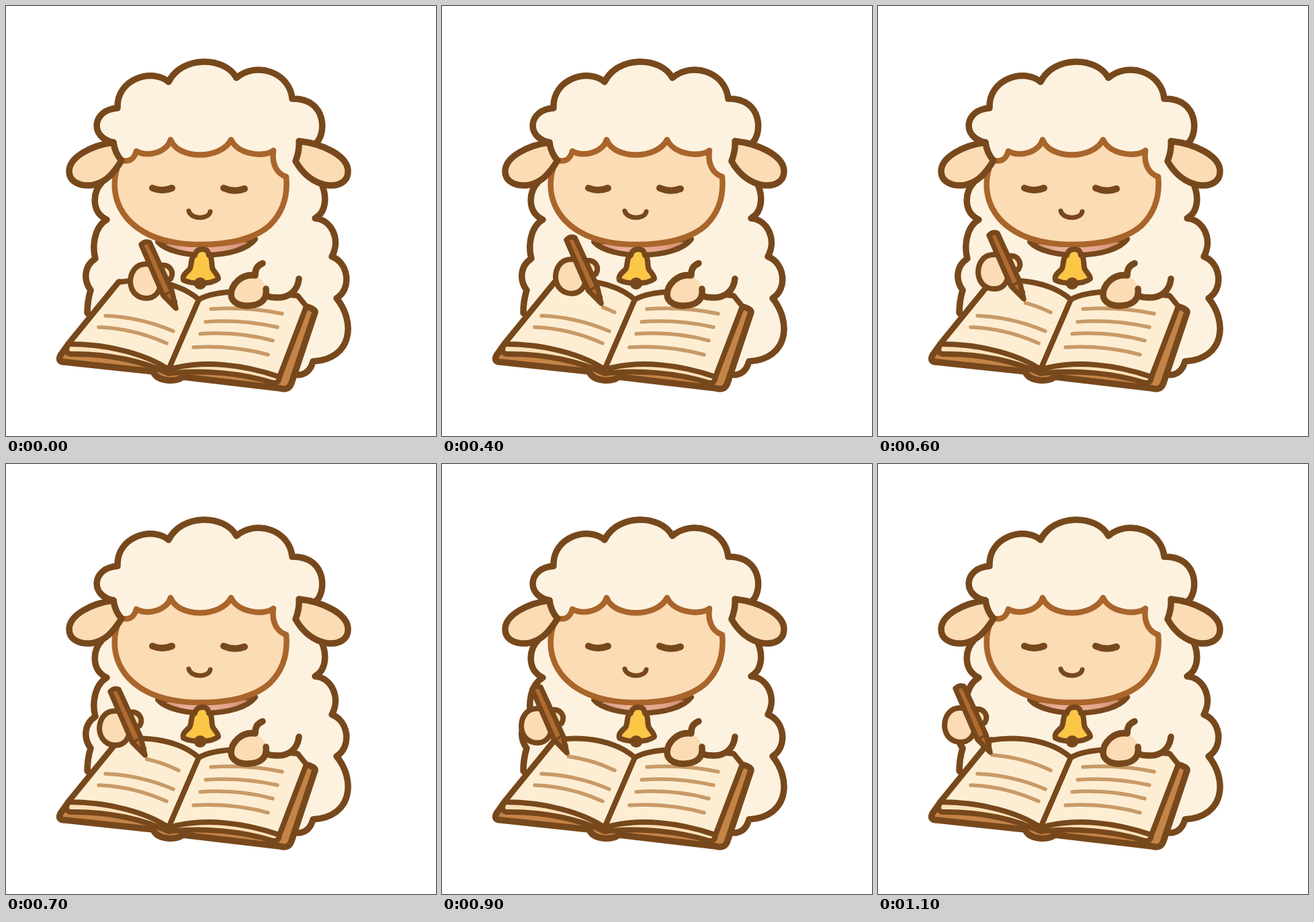
These frames come from a looping animation (640 px wide and 640 px high, 1400 ms). An HTML page:

```html
<!DOCTYPE html>
<html lang="en">
<head>
<meta charset="utf-8">
<title>Writing sheep</title>
<style>
  html, body { margin: 0; width: 100%; height: 100%; overflow: hidden; background: #fff; }
  svg { display: block; width: 100%; height: 100%; }
  .ink { stroke: #77481c; stroke-width: 9.5; stroke-linecap: round; stroke-linejoin: round; fill: none; }
  .wool { fill: #fdf2e0; }
  .skin { fill: #fbdcb4; }
  .page { fill: #fdeed3; }
  .rim { stroke: #a9652b; stroke-width: 8.5; }
  .thin { stroke-width: 8; }
  .text { stroke: #c89a67; stroke-width: 5.5; stroke-linecap: round; fill: none; }
</style>
</head>
<body>
<svg viewBox="0 0 640 640">
  <defs>
    <clipPath id="written"><rect id="reveal" y="400" width="200" height="80"/></clipPath>
    <linearGradient id="collar">
      <stop offset="0" stop-color="#cf8a6c"/><stop offset=".3" stop-color="#eab09a"/>
      <stop offset=".7" stop-color="#e5a48c"/><stop offset="1" stop-color="#c98163"/>
    </linearGradient>
  </defs>

  <!-- body and head wool -->
  <path class="ink wool" d="M143 262C129 277 126 306 150 318C131 329 128 358 133 376
    C116 387 115 408 126 423Q121 439 121 457L250 540L437 549Q452 547 457 529
    C517 525 520 469 492 435C515 421 510 382 485 373C499 347 484 318 460 316
    C478 306 478 280 468 262L460 205C477 194 479 137 426 138
    C422 98 372 82 343 107C325 74 261 74 242 113C218 92 164 108 166 152
    C128 154 124 196 160 203Z"/>

  <!-- collar -->
  <path class="ink thin" fill="url(#collar)" style="fill:url(#collar)" d="M226 351C250 378 348 378 371 347Z"/>

  <!-- face -->
  <path class="ink skin rim" d="M170 229Q189 235 194 216C212 226 240 217 245 199
    C256 229 320 229 335 199C345 221 384 226 398 215C395 236 404 250 417 254
    C420 285 410 309 393 326C369 348 328 355 290 355C246 355 207 345 182 318
    C158 291 157 258 170 229Z"/>

  <!-- ears -->
  <path class="ink skin" d="M160 203C129 207 94 224 94 246C94 262 110 268 126 267C148 264 160 249 172 230Q162 219 160 203Z"/>
  <path class="ink skin" d="M436 201C470 205 509 222 509 246C509 262 495 268 480 267C456 264 440 247 431 231Q437 215 436 201Z"/>

  <!-- closed eyes and smile -->
  <path class="ink" style="stroke-width:10" d="M218 271Q232 277 247 271M324 271Q340 278 355 272"/>
  <path class="ink" style="stroke-width:7" d="M272 305C275 318 302 318 304 306"/>

  <!-- bell -->
  <path class="ink thin" style="fill:#fcc646" d="M292 362C284 362 282 367 281 371C274 374 277 387 273 392
    C268 397 262 401 264 408C276 414 305 415 316 406C316 401 311 397 308 392C305 386 308 374 302 371C301 366 300 362 292 362Z"/>
  <ellipse cx="289" cy="413" rx="9.5" ry="9" fill="#77481c"/>

  <!-- book -->
  <path class="ink" style="fill:#c58447" d="M93 503L81 520Q76 530 88 530L219 544C225 560 255 560 263 552
    L408 569Q421 573 425 561L460 456Q461 451 446 447L287 437L168 411Z"/>
  <path class="ink page thin" style="fill:#fbe1ba" d="M93 503Q86 516 96 518C155 517 207 530 242 547
    C292 541 350 546 398 561Q407 562 407 550L287 437Z"/>
  <path class="ink page thin" d="M168 411L93 503C153 503 210 519 242 541L287 437C259 412 212 404 168 411Z"/>
  <path class="ink page thin" d="M287 437L242 541C295 526 355 534 407 552L447 447L434 431C390 428 322 417 287 437Z"/>
  <path class="text" d="M148 461Q200 463 249 484M138 478Q190 480 239 502
    M305 451Q360 447 411 458M297 470Q350 466 404 478M289 488Q345 484 397 498M279 508Q335 504 390 519"/>
  <path class="text" clip-path="url(#written)" d="M169 433Q218 437 257 456"/>

  <!-- resting arm -->
  <path class="wool" d="M371 401L383 384L436 407C434 425 420 434 405 434L387 432Z"/>
  <path class="ink" d="M436 406C434 425 420 434 405 434Q393 434 387 431"/>
  <path class="skin" d="M371 401C350 398 335 415 335 430C336 443 350 447 362 446C379 445 387 437 388 425Q386 408 371 401Z"/>
  <path class="ink" d="M382 383Q370 388 371 401C350 398 335 415 335 430C336 443 350 447 362 446C378 445 389 438 387 421"/>

  <!-- writing hand -->
  <g id="hand">
    <path class="ink skin thin" d="M231 386C244 384 251 396 245 406L236 410Z"/>
    <path class="ink skin thin" d="M208 384C192 384 185 398 185 411C186 427 197 435 209 435C222 435 230 425 230 411C230 395 222 384 208 384Z"/>
    <path class="ink" style="fill:#b06b30;stroke-width:7.5" d="M201 355Q207 349 214 352L247 424L253 450L234 431Z"/>
    <path class="ink" style="stroke-width:4" d="M234 431L247 424"/>
    <path d="M244 438L255 438L254 454Z" fill="#77481c"/>
  </g>
</svg>
<script>
const hand = document.getElementById('hand');
const reveal = document.getElementById('reveal');
const LOOP = 1400, STEP = 100, START = 200;
// leftward travel of the hand at each step
const travel = [0, 5, 16, 26, 36, 46, 60, 67, 75, 86];
const reach = travel[travel.length - 1];

function draw(now) {
  const step = Math.floor((now % LOOP - START) / STEP);
  const x = travel[Math.max(0, Math.min(step, travel.length - 1))];
  const lift = 21 * (1 - (1 - x / reach) ** 2);
  hand.setAttribute('transform', `translate(${-x} ${-lift})`);
  reveal.setAttribute('x', x ? 253 - x : 260);
  requestAnimationFrame(draw);
}
draw(performance.now());
</script>
</body>
</html>
```
